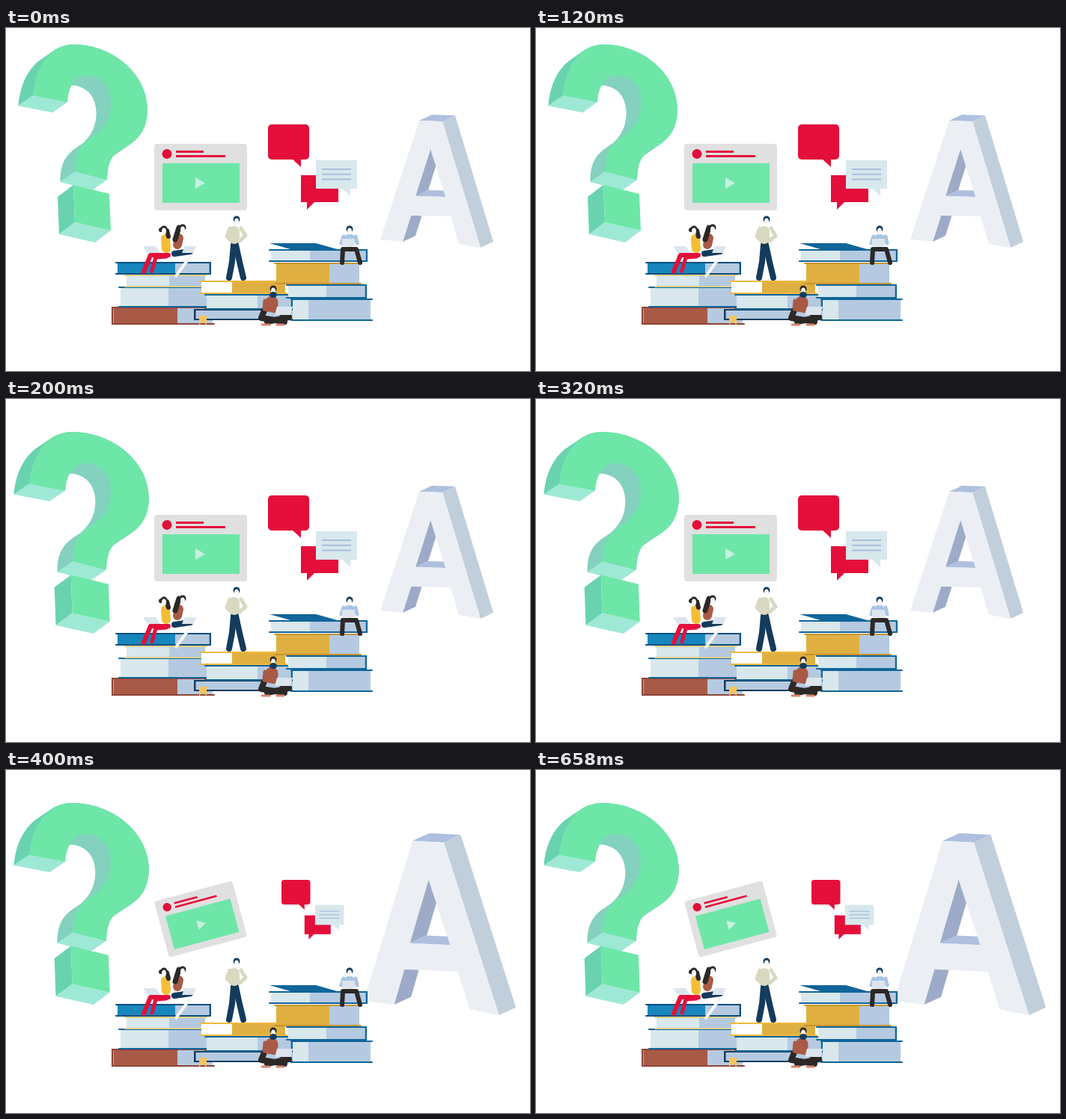
An HTML page with a canvas for the animation above (830 ms loop, 700 by 459 pixels).

```html
<!DOCTYPE html>
<html lang="en">
<head>
<meta charset="utf-8">
<title>Questions and answers</title>
<style>
html, body { margin: 0; width: 100%; height: 100%; overflow: hidden; background: #fff; }
canvas { display: block; }
</style>
</head>
<body>
<canvas id="stage" width="700" height="459"></canvas>
<script>
const ctx = document.getElementById('stage').getContext('2d');
const LOOP = 830, GROW_MARK = 200, GROW_LETTER = 400;
const RED = '#e30f3a', MINT = '#6ee6a8', TEAL = '#69d3b0', AQUA = '#9ee9d5',
      PALE = '#d8e8ec', SKY = '#b5cae1', BLUE = '#10659a', GOLD = '#dfb041',
      BRICK = '#a95a46', NAVY = '#143b5c', DARK = '#2c2826', SKIN = '#f7f7f5';

ctx.lineCap = ctx.lineJoin = 'round';

function rect(color, x, y, w, h, r = 0) {
  ctx.fillStyle = color;
  ctx.beginPath();
  ctx.roundRect(x, y, w, h, r);
  ctx.fill();
}

function dot(color, x, y, rx, ry = rx) {
  ctx.fillStyle = color;
  ctx.beginPath();
  ctx.ellipse(x, y, rx, ry, 0, 0, 2 * Math.PI);
  ctx.fill();
}

const outline = points => 'M' + points.join('L') + 'Z';

function poly(color, ...points) {
  ctx.fillStyle = color;
  ctx.fill(new Path2D(outline(points)));
}

// The side face that an edge leaves behind when it is pushed back by `depth`.
function wall(color, depth, a, b) {
  const back = ([x, y]) => [x + depth[0], y + depth[1]];
  poly(color, a, b, back(b), back(a));
}

function limb(color, width, ...points) {
  ctx.strokeStyle = color;
  ctx.lineWidth = width;
  ctx.stroke(new Path2D('M' + points.join('L')));
}

function placed(matrix, draw) {
  ctx.save();
  ctx.transform(...matrix);
  draw();
  ctx.restore();
}

const MARK_DEPTH = [-20, 14];
const hook = new Path2D('M36 90C38 65 47 43 64 30C72 25 80 22 92 22C143 23 188 61 189 108C189 140 173 153 153 163C138 172 136 185 135 203L92 192C92 172 96 160 110 149C128 139 141 122 140 98C139 75 125 64 108 63C93 63 83 78 82 99Z');
const hookSides = new Path2D();
for (let i = 0; i <= 1; i += 0.025) {
  hookSides.addPath(hook, new DOMMatrix([1, 0, 0, 1, MARK_DEPTH[0] * i, MARK_DEPTH[1] * i]));
}
const sideTint = ctx.createLinearGradient(65, 0, 66, 0);
sideTint.addColorStop(0, TEAL);
sideTint.addColorStop(1, '#83d1be');

function questionMark() {
  ctx.fillStyle = sideTint;
  ctx.fill(hookSides);
  wall(AQUA, MARK_DEPTH, [36, 90], [82, 99]);
  wall(AQUA, MARK_DEPTH, [92, 192], [135, 203]);
  ctx.fillStyle = MINT;
  ctx.fill(hook);

  const block = [[90, 210], [138, 222], [140, 271], [92, 260]];
  wall(TEAL, [-21, 16], block[0], block[3]);
  wall(AQUA, [-21, 16], block[3], block[2]);
  poly(MINT, ...block);
}

function letterA() {
  const depth = [17, -8], shade = '#9dabc8', top = '#aebfdf';
  const front = [[552, 124], [583, 125], [634, 294], [605, 289], [594, 252], [541, 251], [530, 286], [500, 283]];
  const hole = [[567, 162], [587, 226], [547, 225]];
  wall(shade, depth, front[5], front[6]);
  wall(shade, depth, hole[0], hole[2]);
  wall(top, depth, hole[2], hole[1]);
  wall(top, depth, front[0], front[1]);
  wall('#c1cfdc', depth, front[1], front[2]);
  ctx.fillStyle = '#ebeff4';
  ctx.fill(new Path2D(outline(front) + outline(hole)), 'evenodd');
}

function videoCard() {
  rect('#e0e0e0', -62, -44.5, 124, 89, 4);
  dot(RED, -45, -31, 6.5);
  rect(RED, -33, -35.5, 37, 3);
  rect(RED, -33, -29.5, 66, 3);
  rect(MINT, -51, -18.5, 103, 53);
  poly('#c5f2de', [-7, 0.5], [6, 8], [-7, 15.5]);
}

function bubble(color, x, y, w, h, r, tail, lean) {
  rect(color, x, y, w, h, r);
  poly(color, [tail, y + h - 4], [tail, y + h + 10], [tail + lean, y + h - 1], [tail + lean, y + h - 4]);
}

function chat() {
  bubble(RED, 350, 129, 55, 47, 5, 394, -12);
  bubble(RED, 394, 197, 50, 36, 0, 402, 11);
  bubble(PALE, 414, 177, 55, 38, 0, 460, -12);
  for (let i = 0; i < 3; i++) rect('#a9bfe0', 422, 188 + 6.7 * i, 39, 2);
}

// Two boards around a two-tone block; `spine` closes the left (-1) or right (1) end.
function book(x, y, w, h, cover, split, left, right, spine = 0) {
  rect(left, x + 3, y, split - x - 3, h);
  rect(right, split, y, x + w - split - 3, h);
  rect(cover, x, y, w, 2, 1);
  rect(cover, x, y + h - 2, w, 2, 1);
  if (spine) rect(cover, spine < 0 ? x : x + w - 2.5, y, 2.5, h, 1);
}

function books() {
  book(141, 373, 138, 24, '#8f4436', 229, BRICK, SKY, -1);
  book(150, 346, 122, 28, BLUE, 217, PALE, SKY);
  book(158, 330, 111, 17, '#e3cf8a', 218, PALE, SKY);
  book(146, 313, 128, 17, '#0c4f7c', 226, '#1786bd', SKY, 1);

  book(251, 376, 139, 15, NAVY, 336, SKY, SKY, -1);
  book(265, 356, 118, 21, BLUE, 336, PALE, SKY, 1);
  book(258, 338, 118, 18, '#f0b83d', 302, '#fff', GOLD);
  poly('#f6c45a', [258, 385], [268, 385], [268, 397], [263, 393], [258, 397]);

  book(380, 362, 110, 30, BLUE, 404, PALE, SKY);
  book(374, 343, 108, 19, BLUE, 428, PALE, SKY, 1);
  book(358, 314, 117, 29, '#c8942f', 432, GOLD, SKY);
  book(351, 296, 132, 17, BLUE, 406, PALE, SKY, 1);
  poly(BLUE, [352, 288], [414, 288], [446, 297], [380, 296]);
}

function head(x, y, hair) {
  dot(hair, x, y - 2, 4.5, 4.5);
  dot(SKIN, x, y + 1, 3, 4.5);
}

function laptop(x, y, w, h, lean) {
  poly('#dce5ed', [x, y], [x + w, y], [x + w + lean, y + h], [x + lean, y + h]);
}

function seatedWomen() {
  limb(SKIN, 4, [248, 303], [227, 332]);
  limb(NAVY, 8, [225, 302], [246, 299]);
  limb(BRICK, 12, [231, 281], [229, 290]);
  limb(DARK, 7, [231, 267], [226, 283]);
  head(236, 269, DARK);
  laptop(239, 292, 15, 9, -4);

  limb(RED, 6, [217, 304], [193, 304], [184, 326]);
  limb(RED, 5, [214, 306], [200, 307], [195, 325]);
  limb('#f4bd33', 12, [213, 282], [214, 295]);
  limb(DARK, 6, [207, 270], [215, 271], [217, 279]);
  head(211, 271, DARK);
  laptop(183, 292, 17, 9, 6);
}

function standingMan() {
  limb(NAVY, 8, [304, 290], [302, 313], [298, 334]);
  limb(NAVY, 8, [307, 290], [312, 313], [317, 334]);
  limb('#d9d9c2', 14, [305, 272], [305, 282]);
  limb('#d9d9c2', 5, [299, 268], [295, 279], [301, 285]);
  limb('#d9d9c2', 5, [314, 268], [320, 278], [312, 285]);
  head(308, 258, NAVY);
}

function beardedMan() {
  limb(DARK, 8, [345, 378], [341, 388], [372, 393]);
  limb(DARK, 8, [366, 380], [378, 387], [349, 393]);
  limb('#d9846d', 3, [342, 397], [352, 397]);
  limb('#d9846d', 3, [362, 397], [371, 397]);
  limb(BRICK, 17, [355, 367], [355, 370]);
  limb(BRICK, 5, [346, 365], [345, 376], [360, 379]);
  head(357, 351, DARK);
  dot(NAVY, 357, 357, 5, 4);
  laptop(362, 373, 21, 11, -3);
}

function readingMan() {
  limb(DARK, 6, [449, 314], [450, 296], [468, 296], [473, 314]);
  limb('#a9c5e5', 15, [459, 283], [459, 285]);
  limb('#a9c5e5', 5, [451, 279], [448, 288]);
  limb('#a9c5e5', 5, [467, 279], [469, 288]);
  head(459, 271, NAVY);
  laptop(449, 282, 17, 10, 0);
}

const STILL = [1, 0, 0, 1, 0, 0];
const MARK_GROWN = [1.046, 0, -0.006, 1.019, -6.1, 21.6];
const LETTER_GROWN = [1.345, 0.03, 0.03, 1.357, -203, -90];
const CHAT_SHRUNK = [0.7, 0, 0, 0.7, 123, 56.7];

function draw(t) {
  const late = t >= GROW_LETTER;
  ctx.fillStyle = '#fff';
  ctx.fillRect(0, 0, 700, 459);
  placed(t >= GROW_MARK ? MARK_GROWN : STILL, questionMark);
  placed(late ? LETTER_GROWN : STILL, letterA);
  const turn = late ? -Math.PI / 12 : 0, size = late ? 0.87 : 1;
  const cos = size * Math.cos(turn), sin = size * Math.sin(turn);
  placed([cos, sin, -sin, cos, 260, 199.5], videoCard);
  placed(late ? CHAT_SHRUNK : STILL, chat);
  books();
  seatedWomen();
  standingMan();
  beardedMan();
  readingMan();
}

const start = performance.now();
function tick() {
  draw((performance.now() - start) % LOOP);
  requestAnimationFrame(tick);
}
tick();
</script>
</body>
</html>
```
